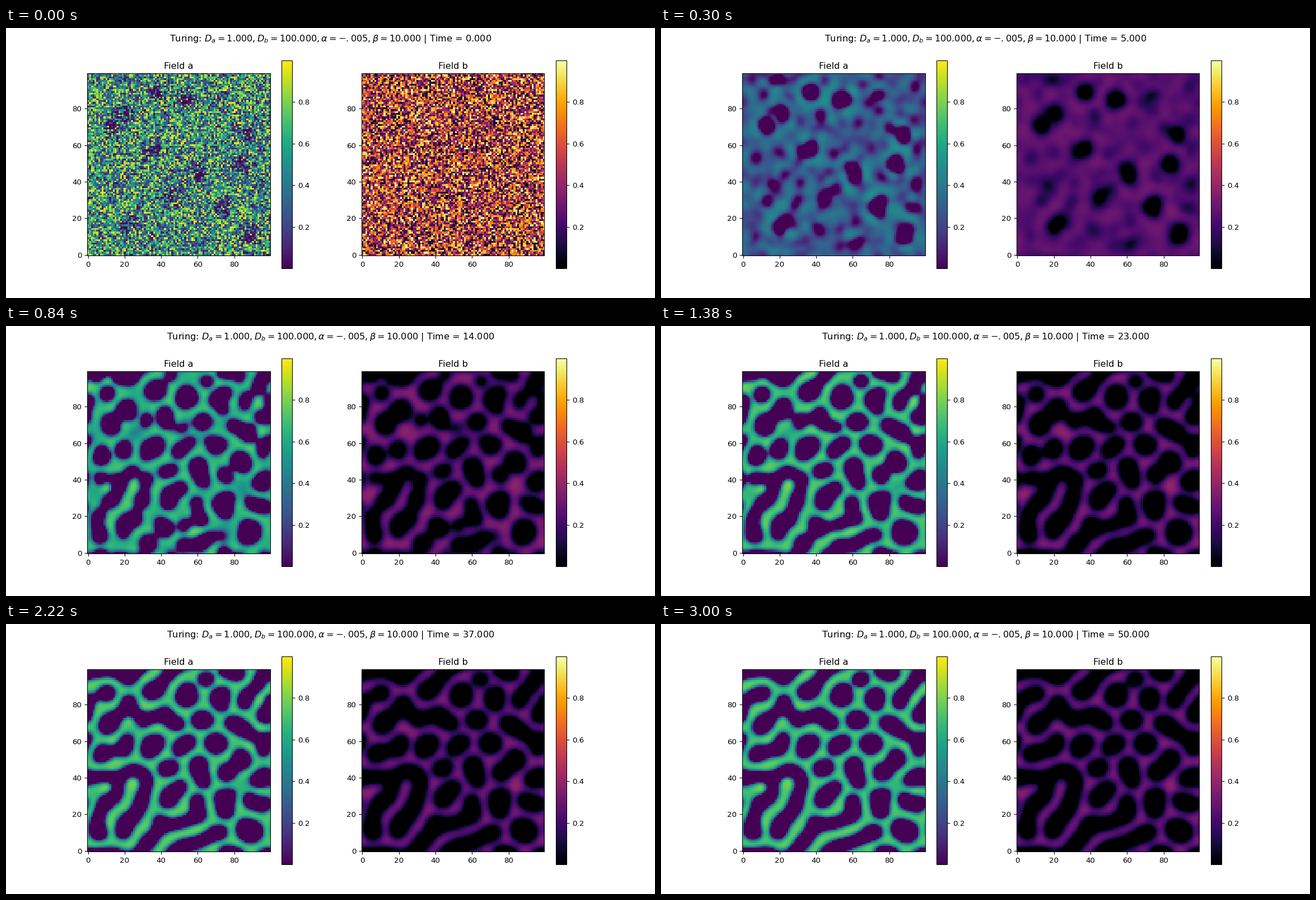
A matplotlib script for the animation above (3.06 s loop, 1159 px wide and 483 px high).

```python
import matplotlib.pyplot as plt
import numpy as np
from matplotlib.animation import FuncAnimation

N, FRAMES, SUBSTEPS = 100, 51, 40
DA, DB, ALPHA, BETA = 1.0, 100.0, -0.005, 10.0
SCALE = 0.966

# Places where the starting noise is darker, so that the first spots form there
SPOTS = [(53, 85), (38, 88), (20, 78), (13, 70), (36, 57), (88, 65),
         (83, 49), (60, 45), (47, 32), (73, 26), (89, 11), (22, 16)]


def wrap(d):
    return (d + N / 2) % N - N / 2


def initial_fields():
    rng = np.random.default_rng(7)
    y, x = np.mgrid[:N, :N]
    dark = sum(np.exp(-(wrap(x - cx) ** 2 + wrap(y - cy) ** 2) / 16)
               for cx, cy in SPOTS)
    return rng.random((N, N)) ** (1 + 3 * dark), rng.random((N, N))


def simulate():
    """Periodic reaction-diffusion, with diffusion solved in Fourier space."""
    a, b = initial_fields()
    states = [(a, b)]
    kx = 2 * np.pi * np.fft.rfftfreq(N)
    ky = 2 * np.pi * np.fft.fftfreq(N)[:, None]
    lap = 4 - 2 * np.cos(kx) - 2 * np.cos(ky)
    dt = 1 / SUBSTEPS
    damp_a = 1 + dt * DA * lap
    damp_b = 1 + dt * (BETA + DB * lap)
    b_hat = np.fft.rfft2(b)
    for _ in range(FRAMES - 1):
        for _ in range(SUBSTEPS):
            a_hat = np.fft.rfft2(a + dt * (a - a ** 3 - b + ALPHA)) / damp_a
            b_hat = (b_hat + dt * BETA * a_hat) / damp_b
            a = np.fft.irfft2(a_hat, s=(N, N))
            b = np.fft.irfft2(b_hat, s=(N, N))
        states.append((a, b))
    return states


def heading(t):
    return (rf"Turing: $D_a = {DA:.3f}, D_b = {DB:.3f}, "
            rf"\alpha = {{-}}.005, \beta = {BETA:.3f}$ | Time = {t:.3f}")


plt.rcParams.update({
    "font.family": "DejaVu Sans",
    "font.size": 10 * SCALE,
    "axes.linewidth": 0.8 * SCALE,
    "axes.titlepad": 6 * SCALE,
})
for axis in ("xtick", "ytick"):
    plt.rcParams[f"{axis}.major.size"] = 3.5 * SCALE
    plt.rcParams[f"{axis}.major.width"] = 0.8 * SCALE
    plt.rcParams[f"{axis}.major.pad"] = 3.5 * SCALE

states = simulate()
fig, axes = plt.subplots(ncols=2, figsize=(11.59, 4.83), dpi=100)
images = []
for ax, field, name, cmap in zip(axes, states[0], "ab", ("viridis", "inferno")):
    image = ax.imshow(field, cmap=cmap, origin="lower", interpolation="nearest",
                      vmin=0.0002, vmax=0.9998)
    ax.set_xticks(range(0, N, 20))
    ax.set_yticks(range(0, N, 20))
    ax.set_title(f"Field {name}")
    fig.colorbar(image, ax=ax, aspect=19, ticks=[0.2, 0.4, 0.6, 0.8])
    images.append(image)
title = fig.suptitle(heading(0))


def update(i):
    for image, field in zip(images, states[i]):
        image.set_data(field)
    title.set_text(heading(i))
    return [*images, title]


anim = FuncAnimation(fig, update, frames=FRAMES, interval=60,
                     repeat=True, repeat_delay=0, blit=False)
plt.show()
```
